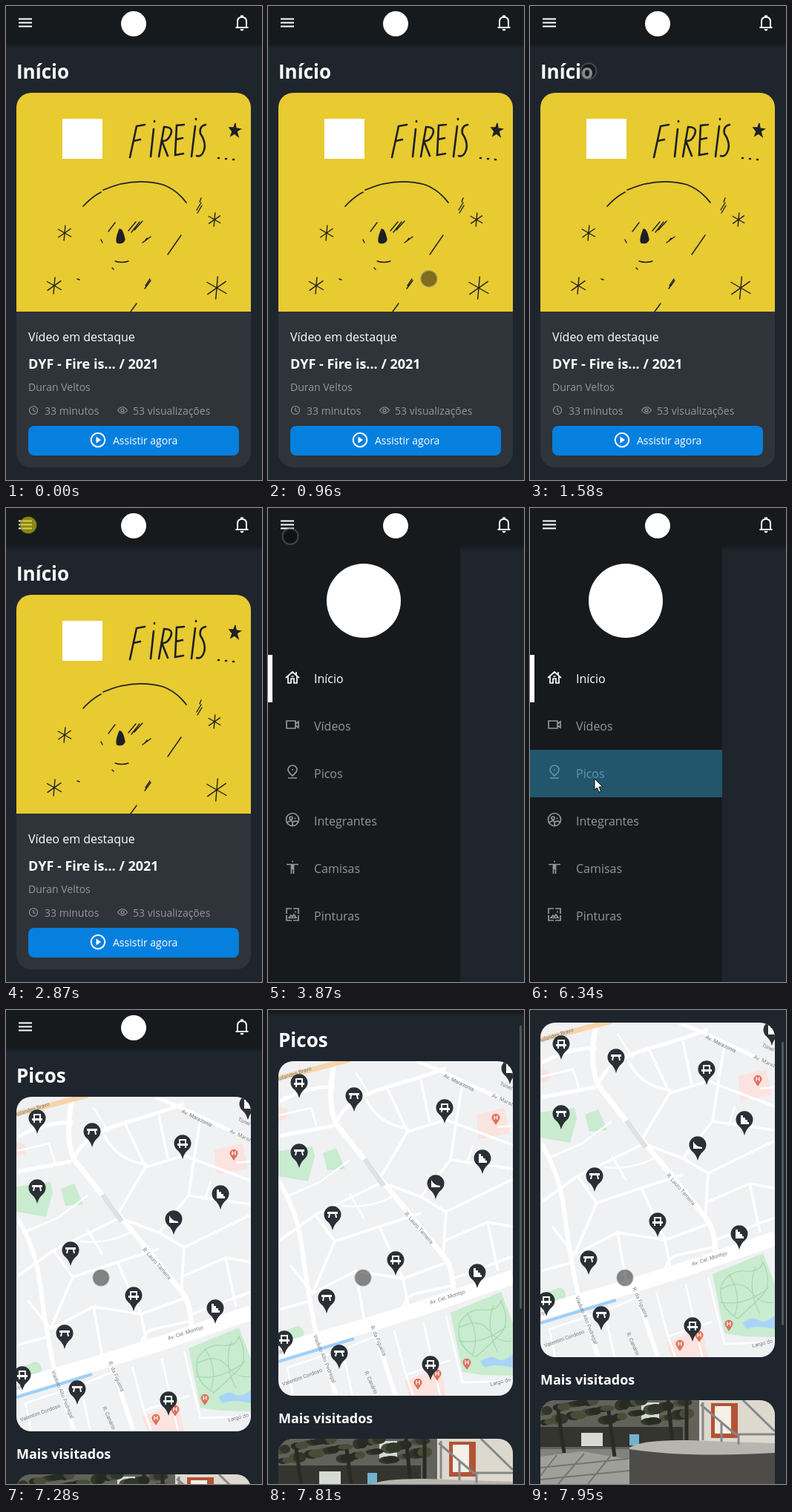
An HTML page that plays this animation: 345x639 px, repeating every 8000 ms.

```html
<!DOCTYPE html>
<html lang="pt">
<head>
<meta charset="utf-8">
<style>
html, body { margin: 0; width: 100%; height: 100%; overflow: hidden; background: #1f252d; }
svg { display: block; font-family: "Open Sans", sans-serif; fill: #fff; }
.line { fill: none; stroke: currentColor; stroke-width: 2; }
.ink { fill: none; stroke: #1d2023; stroke-width: 1.4; stroke-linecap: round; color: #1d2023; }
.grey { fill: #94989b; color: #94989b; }
.h1 { font-size: 26px; font-weight: 700; }
.h2 { font-size: 18px; font-weight: 700; }
.m { font-size: 16px; }
.s { font-size: 14px; }
.street { font: 7.2px Roboto, sans-serif; fill: #747a80; }
.road { fill: none; stroke: #fff; stroke-linejoin: round; }
</style>
</head>
<body>
<svg width="345" height="639" viewBox="0 0 345 639" color="#fff">
  <defs>
    <clipPath id="cardClip"><rect x="14" y="117" width="316" height="505" rx="20"/></clipPath>
    <clipPath id="mapClip"><rect x="14" y="117" width="316" height="451" rx="20"/></clipPath>
    <clipPath id="photoClip"><rect x="14" y="626" width="316" height="220" rx="20"/></clipPath>
    <clipPath id="itemClip"><rect y="326" width="259" height="64"/></clipPath>
    <linearGradient id="shade" x2="0" y2="1"><stop stop-opacity=".3"/><stop offset="1" stop-opacity="0"/></linearGradient>
  </defs>
  <rect width="345" height="639" fill="#1f252d"/>

  <g id="scroll">
    <rect y="50" width="345" height="8" fill="url(#shade)"/>
    <rect width="345" height="51" fill="#171a1c"/>
    <path class="line" d="M17 17.5H35M17 22.5H35M17 27.5H35"/>
    <circle cx="172" cy="24" r="17"/>
    <path class="line" d="M312 29V21Q312 15 318 15T324 21V29M309.5 29H326.500"/>
    <path d="M316 12.500h4v3h-4zM315.500 31h5q-.5 2.500-2.500 2.500t-2.500-2.500z"/>

    <g id="home">
      <text class="h1" x="14" y="98">Início</text>
      <g clip-path="url(#cardClip)">
        <rect x="14" y="117" width="316" height="505" fill="#2e3439"/>
        <rect x="14" y="117" width="316" height="295" fill="#e8ca31"/>
        <rect x="76" y="152" width="54" height="54"/>
        <g class="ink">
          <path stroke-width="2.600" d="M187 160L176 162L167 204M172 182L181 180M199 166L195 203M200 155v1M206 203L213 163Q226 163 222 173T210 182L218 202M240 160L230 161L228 201L239 199M229 180L238 178M255 162L250 203M256 152v1M269 160Q260 162 262 172Q270 184 267 194Q264 204 257 202M286 205h1M296 206h1M306 207h1"/>
          <path d="M104 270Q116 257 128 251M131 248Q172 230 212 241Q230 248 243 265" stroke-width="1.700"/>
          <path d="M165 303L175 291M169 305L180 291M173 302L184 290M138 304L147 292M128 315L130 319M218 335L236 309M258 279L264 269M257 275L263 265M261 264L263 259M184 319L195 311M187 317L190 313M187 381L195 370M188 377L194 368M143 353L145 355M96 368L99 369M168 412L176 401M147 344Q156 347 165 344"/>
          <path d="M153 301Q157 300 160 315Q158 321 150 319Q147 316 153 301Z" fill="currentColor"/>
          <g id="stars"></g>
          <path d="M309 158l1 7 6 1-5 3 2 7-5-4-5 3 2-6-4-5 6 0z" fill="currentColor"/>
        </g>
      </g>
      <text class="m" x="30" y="452">Vídeo em destaque</text>
      <text class="h2" x="30" y="489">DYF - Fire is... / 2021</text>
      <g class="grey s">
        <text x="30" y="519">Duran Veltos</text>
        <text x="52" y="551">33 minutos</text>
        <text x="171" y="551">53 visualizações</text>
        <path class="line" style="stroke-width:1.200" d="M31.500 545a5.500 5.500 0 1 0 11 0a5.500 5.500 0 1 0-11 0M37 541.500V545.500L39.500 547M150.500 545Q157 536.500 163.500 545Q157 553.500 150.500 545ZM155 545a2 2 0 1 0 4 0a2 2 0 1 0-4 0"/>
      </g>
      <rect x="30" y="566" width="284" height="40" rx="8" fill="#0680df"/>
      <circle class="line" cx="124" cy="585" r="9.300"/>
      <path d="M121.500 580.500v9l6.500-4.500z"/>
      <text class="s" x="144" y="591">Assistir agora</text>
    </g>

    <g id="spots">
      <text class="h1" x="14" y="98">Picos</text>
      <rect x="14" y="117" width="316" height="451" rx="20" fill="#2e3439"/>
      <text class="h2" x="14" y="605">Mais visitados</text>
      <g id="images">
        <g clip-path="url(#mapClip)">
          <rect x="14" y="117" width="316" height="451" fill="#f0f1f3"/>
          <path fill="#c9ebcf" d="M14 238L60 232L63 246L54 279L14 272ZM74 241L92 234L104 262L80 264ZM14 484L40 474Q52 478 46 492L14 502ZM246 456L314 428L330 470V541L288 540L262 536Z"/>
          <path fill="#fbe3df" d="M281 189L318 180L326 214L284 222ZM14 178l12 4v12l-12 4zM184 548L232 530L240 568H190Z"/>
          <path fill="#a8d4fa" d="M286 522Q300 512 308 518T330 512V530Q306 524 292 530Z"/>
          <path fill="none" stroke="#a5d7b0" stroke-width="1.200" d="M258 470Q270 450 290 452T314 440Q328 470 312 486T280 516Q252 500 258 470M258 476Q284 462 298 480T328 494M268 456Q286 484 276 512M304 446Q292 476 310 510M256 494Q290 500 322 474"/>
          <g id="roads"></g>
          <path d="M130 249L156 285" stroke="#dfe1e3" stroke-width="7"/>
          <path d="M14 140L110 115" stroke="#f7d4aa" stroke-width="7"/>
          <path d="M14 522L116 491" stroke="#9dd0fa" stroke-width="4"/>
          <g id="streets"></g>
          <g id="pins"></g>
        </g>
        <g clip-path="url(#photoClip)">
          <rect x="14" y="626" width="316" height="220" fill="#82837f"/>
          <rect x="14" y="626" width="215" height="66" fill="#62625a"/>
          <path fill="#34352f" d="M14 662H206V689H14Z"/>
          <path fill="#d6dad5" d="M69 670h29v18h-29zM150 629h24v25h-24z"/>
          <path fill="#73b2cd" d="M134 672h13v15h-13z"/>
          <g id="leaves"></g>
          <path d="M38 640L46 697M106 640L114 702M186 626L192 684M211 626V688" stroke="#292a25" stroke-width="5"/>
          <path fill="#a0a09b" d="M14 702L70 695L134 706V846H14Z"/>
          <path d="M14 717L132 705M14 733L134 721M36 700L14 728M73 698L38 739M108 702L78 739" stroke="#74756f" stroke-width="2"/>
          <path fill="#ddd9cf" d="M228 626H330V690H228Z"/>
          <path fill="#b35335" d="M244 630h36v47h-36z"/>
          <path fill="#f4f0e6" d="M249 634h22v37h-22z"/>
          <path fill="#4d4c49" d="M134 690Q230 702 330 692V846H134Z"/>
          <path fill="#b7b5ae" d="M134 690Q150 679 214 680L330 684V697Q210 704 134 692Z"/>
          <path d="M230 632L277 672H330M233 629V680M258 656V682M281 672V686M287 626L330 668" fill="none" stroke="#85888a" stroke-width="3"/>
        </g>
      </g>
    </g>
  </g>

  <g id="menu">
    <rect y="51" width="259" height="588" fill="#171a1c"/>
    <circle cx="129" cy="125" r="50"/>
    <rect y="198" width="6" height="64"/>
    <g id="items"></g>
    <circle id="ripple" cx="88" cy="364" fill="#2c92be" opacity=".5" clip-path="url(#itemClip)"/>
  </g>

  <rect id="bar" x="339" width="3" height="382" rx="1" fill="#50565c"/>
  <circle id="touch" r="10.500" stroke-width="2"/>
  <path id="arrow" d="M87 365v15l3.500-3 2.500 6 2.500-1-2.500-6h5z" stroke="#111"/>
</svg>
<script>
const $ = id => document.getElementById(id);
const fill = (id, list, draw) => $(id).innerHTML = list.map(draw).join('');

// Hand-drawn asterisks: x, y, radius
fill('stars', [[79, 306, 10], [281, 288, 9], [65, 377, 11], [284, 380, 15]], ([x, y, r]) =>
  [95, 30, 145].map(a => {
    const c = r * Math.cos(a * Math.PI / 180), s = r * Math.sin(a * Math.PI / 180);
    return `<path d="M${x - c} ${y - s}L${x + c} ${y + s}"/>`;
  }).join(''));

fill('roads', [
  [20, 'M14 508L130 474L210 449L330 408'],
  [7, 'M90 117Q78 170 92 202L130 250L190 322L240 384Q250 400 250 436'],
  [6, 'M14 278Q40 320 46 370T64 480L92 568M140 470L172 568'],
  [5, 'M200 117Q240 132 330 176M14 172Q54 150 90 152M92 200Q104 168 160 152T240 126M14 218L88 204'],
  [3.500, 'M160 152L188 212L240 196L330 230M188 212L150 276M132 168Q150 204 190 208M206 142L218 200M262 148L254 196L246 250L330 262M246 250L206 300L158 282M206 300L240 320L330 276M240 320L236 384M14 360L64 324L150 282M64 324L90 360L60 430M90 360L150 340L206 322M150 340L182 410L242 388M60 430L118 400L182 410M118 400L130 468M182 410L190 452M250 410L330 380M236 360L296 334L330 340M296 334L310 400M30 392L60 430M14 452L58 440M182 452Q184 434 200 430L246 420'],
  [2.500, 'M24 300L70 280L110 250M110 296L130 330M100 312Q140 316 170 298M118 132L138 164M276 230L268 256M310 206L330 204M66 206L58 180L14 190M34 568L26 530L100 506L114 568M100 506L144 488M170 480L186 540L246 520M186 540L196 568M210 470L232 568M240 460L262 550L330 548']
], ([w, d]) => `<path class="road" stroke-width="${w}" d="${d}"/>`);

fill('streets', [
  [12, 144, -18, 'Rolandes Bravo'], [236, 138, 26, 'Av. Marazonia'], [301, 165, 24, 'Av. Marazonia'],
  [312, 149, 24, 'Túnel'], [184, 323, 49, 'R. Lauro Tameira'], [219, 445, -18, 'Av. Cel. Montijo'],
  [-24, 524, -18, 'Av. Cel. Montijo'], [138, 475, 67, 'R. da Figueira'], [61, 487, 68, 'Viaduto Alto Pedregal'],
  [20, 555, -20, 'Valentim Cordoso'], [300, 555, -14, 'Largo do'], [130, 536, 66, 'R. Canário']
], ([x, y, a, s]) => `<text class="street" transform="translate(${x} ${y}) rotate(${a})">${s}</text>`);

const glyphs = {
  bench: 'M-5-6H5V0H7V3H5V6H3V3H-3V6H-5V3H-7V0H-5ZM-3-4V0H3V-4Z',
  table: 'M-7-4H7V-1H5L6 4H4L3-1H-3L-4 4H-6L-5-1H-7Z',
  stairs: 'M-5-6H-2V-3H1V0H4V3H6V6H-5Z',
  ramp: 'M-6-5Q-3 2 6 3V5H-6Z'
};
const pin = ([x, y, kind]) => `<g transform="translate(${x} ${y})">
  <path fill="#2a3036" d="M0 21Q-2 13-8 8A11.500 11.500 0 1 1 8 8Q2 13 0 21Z"/>
  <path fill-rule="evenodd" d="${glyphs[kind]}"/></g>`;
const hospital = ([x, y]) => `<g transform="translate(${x} ${y})">
  <path fill="#dd705b" d="M0 10L-4 4A5.500 5.500 0 1 1 4 4Z"/>
  <path stroke="#fff" stroke-width="1.200" d="M-2-3V3M2-3V3M-2 0H2"/></g>`;
fill('pins', [
  [307, 193], [268, 523], [228, 538], [202, 550],
  [42, 146, 'bench'], [116, 164, 'table'], [238, 180, 'bench'], [42, 240, 'table'], [289, 248, 'stairs'],
  [226, 282, 'ramp'], [87, 324, 'table'], [172, 385, 'bench'], [282, 402, 'stairs'], [79, 436, 'table'],
  [22, 492, 'bench'], [96, 511, 'table'], [219, 526, 'bench'], [326, 127, 'stairs']
], p => p[2] ? pin(p) : hospital(p));

fill('leaves', [...Array(45).keys()], i => {
  const x = 14 + (i * 61.8) % 205, y = 626 + (i * 17) % 31;
  return `<ellipse cx="${x}" cy="${y}" rx="${7 + i % 5}" ry="${4 + i % 4}" fill="${['#30362a', '#494d38', '#272b23'][i % 3]}"/>`;
});

// Icons are drawn in a 20 px box
fill('items', [
  ['Início', 'M1 11L10 3L19 11M4 9V18H8V12H12V18H16V9M15 3V7M8.500 9H11.500'],
  ['Vídeos', 'M2 5H14V15H2ZM14 9L18 6V14L14 11'],
  ['Picos', 'M10 15Q4 10 4 6.500A6 5.500 0 0 1 16 6.500Q16 10 10 15ZM9 7H11M4 18H16'],
  ['Integrantes', 'M1.500 10a8.500 8.500 0 1 0 17 0a8.500 8.500 0 1 0-17 0M6 8a2 2 0 1 0 4 0a2 2 0 1 0-4 0M12.500 8.500h2M3 14Q8 10 10 13V18M10 14Q13 11 17 13'],
  ['Camisas', 'M9 2.500H11M2 6.500H18M8.500 6V19M11.500 6V19M10 7V13'],
  ['Pinturas', 'M2 9V2H9M11 2H18V9M18 11V18H11M9 18H2V11M5 14.500L8 11L10 13L12 10L15 14.500ZM13 6.500h2']
], ([name, d], i) => `<g class="${i ? 'grey' : ''}" transform="translate(0 ${64 * i})">
  <path class="line" style="stroke-width:1.700" transform="translate(23 218)" d="${d}"/>
  <text class="m" x="62" y="236">${name}</text></g>`);

// Keys: [time, ...values], linear between neighbours
function at(keys, t) {
  const i = keys.findIndex(k => k[0] > t);
  if (i < 0) return keys.at(-1).slice(1);
  if (!i) return keys[0].slice(1);
  const a = keys[i - 1], b = keys[i], u = (t - a[0]) / (b[0] - a[0]);
  return a.slice(1).map((v, n) => v + (b[n + 1] - v) * u);
}

const path = [
  [610, 337, 612], [800, 277, 490], [1100, 165, 262], [1370, 98, 147], [1440, 95, 132], [1580, 79, 88],
  [1850, 47, 44], [2140, 26, 23], [2539, 26, 23], [2540, 30, 23], [3800, 30, 23], [3870, 30, 38],
  [4200, 62, 120], [4640, 104, 224], [5100, 100, 305], [5470, 88, 359], [5610, 88, 364],
  [7070, 88, 364], [7140, 100, 363], [7280, 128, 361]
];
const scrollKeys = [[7670, 0], [7740, 14], [7810, 48], [7880, 82], [7950, 100]];
const show = (id, on) => $(id).style.display = on ? '' : 'none';
const set = (id, attrs) => { for (const k in attrs) $(id).setAttribute(k, attrs[k]); };

function draw(t) {
  const menu = t >= 3010 && t < 6670, arrow = t >= 6140 && t < 6670;
  show('home', t < 3010);
  show('menu', menu);
  show('spots', t >= 6670);
  show('arrow', arrow);
  show('touch', t >= 610 && !arrow);

  const [x, y] = at(path, t);
  const pressed = t >= 2870 && t < 3010 || t >= 5940 && t < 6140;
  set('touch', {
    cx: x, cy: y,
    fill: pressed ? 'rgba(190,185,10,.68)' : 'rgba(10,10,10,.48)',
    stroke: pressed ? 'rgba(150,145,20,.7)' : 'rgba(110,110,110,.5)'
  });
  set('ripple', { r: t < 6140 ? 0 : t < 6210 ? 70 : t < 6340 ? 140 : 200 });
  set('images', { opacity: t < 6870 ? 0 : t < 6930 ? .5 : t < 7000 ? .8 : 1 });

  const [offset] = at(scrollKeys, 7670 + 70 * Math.floor((t - 7670) / 70));
  set('scroll', { transform: `translate(0 ${-offset})` });
  const [fade] = at([[7070, 1], [7280, 0]], t);
  set('bar', { y: offset * .43, opacity: t < 6670 ? 0 : offset ? 1 : fade });
}

function tick() {
  draw(performance.now() % 8000);
  requestAnimationFrame(tick);
}
tick();
</script>
</body>
</html>
```
